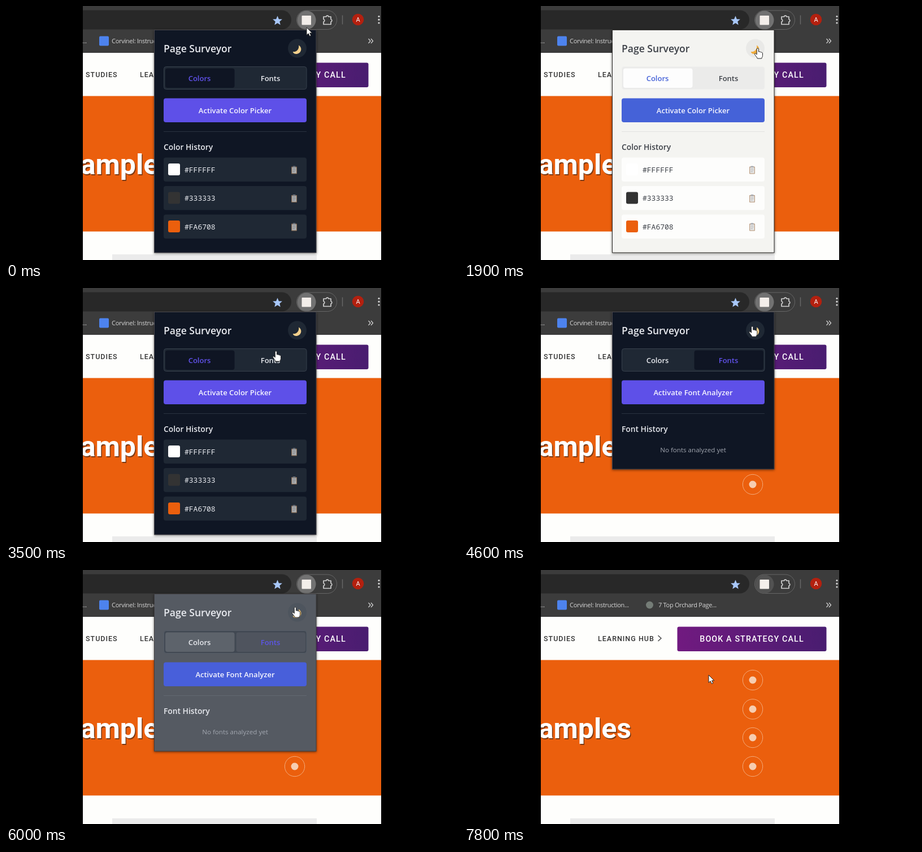
These frames come from a looping animation (800x450 px, 8000 ms). An HTML page:

```html
<!DOCTYPE html>
<html lang="en">
<head>
<meta charset="utf-8">
<title>Colour and font popup</title>
<style>
  html, body { margin: 0; width: 100%; height: 100%; overflow: hidden; background: #000; }
  svg { display: block; width: 800px; height: 450px; }
  .ui { font: 600 13px "Open Sans", "Noto Sans", sans-serif; }
  .mid { text-anchor: middle; }
  .web { font-family: Roboto, Arial, sans-serif; }
  .nav { font-size: 12.5px; font-weight: 500; letter-spacing: 1px; fill: #333; }
  .mark { font: 400 11px "Open Sans", sans-serif; letter-spacing: -.3px; fill: #d6d6d6; }
  .mono { font: 400 13px "Noto Sans Mono", "DejaVu Sans Mono", monospace; fill: var(--text); }
  .text { fill: var(--text); }
  #popup { filter: drop-shadow(0 1px 2px rgba(0, 0, 0, .55)); }
</style>
</head>
<body>
<svg viewBox="0 0 800 450" id="stage">
  <defs>
    <clipPath id="screen"><rect x="136" width="528" height="450"/></clipPath>
    <linearGradient id="purple"><stop stop-color="#711a80"/><stop offset="1" stop-color="#491d70"/></linearGradient>
    <g id="clipboard">
      <rect x="-5" y="-6" width="10" height="13" rx="1" fill="#a8825f"/>
      <rect x="-3.8" y="-4.5" width="7.6" height="10.3" fill="#dcdcdc"/>
      <path d="M-2.5 -2H2.5M-2.5 .5H2.5M-2.5 3H1" stroke="#9b9b9b" stroke-width=".9"/>
      <rect x="-2.5" y="-7" width="5" height="2.6" rx="1" fill="#8b9099"/>
    </g>
  </defs>
  <rect width="800" height="450" fill="#000"/>
  <g clip-path="url(#screen)">
    <!-- browser bars -->
    <rect x="136" width="528" height="83" fill="#3c3c3c"/>
    <rect x="100" y="7.5" width="405" height="34" rx="17" fill="#282828"/>
    <path transform="translate(480.5 26)" fill="#a8c7fa" d="M0 -8.5L2.4 -2.8 8.4 -2.4 3.8 1.6 5.2 7.5 0 4.3 -5.2 7.5 -3.8 1.6 -8.4 -2.4 -2.4 -2.8Z"/>
    <rect x="514.5" y="8" width="71" height="33.5" rx="16.7" fill="none" stroke="#666"/>
    <circle id="glow" cx="532" cy="25" r="16.5"/>
    <rect x="523.5" y="17" width="16.5" height="16.5" rx="1" fill="#f3eeea"/>
    <path d="M562 19H566.5A2.3 2.3 0 0 1 571 19H575V23.5A2.3 2.3 0 0 1 575 28V32.5H562V28A2.3 2.3 0 0 0 562 23.5Z" fill="none" stroke="#d0d0d0" stroke-width="1.7" stroke-linejoin="round"/>
    <path d="M595.5 16.5V32.5" stroke="#666" stroke-width="1.5"/>
    <circle cx="623" cy="24" r="10.3" fill="#b3200f"/>
    <text x="623" y="28" class="web mid" font-size="11" fill="#fff">A</text>
    <g fill="#d8d8d8"><circle cx="660" cy="18.5" r="1.6"/><circle cx="660" cy="24.2" r="1.6"/><circle cx="660" cy="30" r="1.6"/></g>
    <text x="135" y="66" class="mark">...</text>
    <rect x="165" y="53.5" width="17" height="17" rx="2" fill="#4d83ee"/>
    <text x="187" y="66" class="mark">Corvinel: Instruction...</text>
    <circle cx="328.5" cy="62" r="6.5" fill="#757d77"/>
    <text x="344" y="66" class="mark">7 Top Orchard Page...</text>
    <path d="M641.5 58L645 62 641.5 66M646 58L649.5 62 646 66" fill="none" stroke="#d0d0d0" stroke-width="1.3"/>

    <!-- web page -->
    <rect x="136" y="83" width="528" height="367" fill="#fefefc"/>
    <text x="141" y="126" class="web nav">STUDIES</text>
    <text x="237" y="126" class="web nav">LEARNING HUB</text>
    <path d="M343.5 116L349 121 343.5 126" fill="none" stroke="#444" stroke-width="1.4"/>
    <rect x="377.5" y="100.5" width="264" height="43.5" rx="3" fill="url(#purple)"/>
    <text x="509.5" y="127" class="web mid" font-size="14.3" font-weight="500" letter-spacing="1.1" fill="#fff">BOOK A STRATEGY CALL</text>
    <rect x="136" y="159.5" width="528" height="240" fill="#eb5f0d"/>
    <g class="web" font-size="50" font-weight="700" text-anchor="end">
      <text x="297.5" y="299.5" fill="#7a3a15">amples</text>
      <text x="296" y="298" fill="#fff">amples</text>
    </g>
    <g id="social"></g>
    <rect x="188" y="440" width="362" height="10" fill="#ebebeb"/>

    <g id="popup" class="ui">
      <rect id="panel" x="262.5" y="42.5" width="286.5" fill="var(--bg)" stroke="var(--edge)"/>
      <text x="279" y="82" font-size="17.5" class="text">Page Surveyor</text>
      <circle cx="515.5" cy="75" r="16.5" fill="var(--knob)"/>
      <path d="M518 69.5C526 74.500 522 85 513.500 85C510.500 85 508.500 83.500 507.700 81C514 82 519.500 76.500 518 69.500Z" fill="var(--moon)"/>
      <rect x="279.5" y="107.500" width="252.500" height="40" rx="4" fill="var(--frame)" stroke="var(--line)"/>
      <rect id="idle" y="110.500" width="122.500" height="34.500" rx="4" fill="var(--track)"/>
      <rect id="active" y="110.500" width="122.500" height="34.500" rx="4" fill="var(--tab)"/>
      <text id="colorsTab" x="342.500" y="133" class="mid">Colors</text>
      <text id="fontsTab" x="468" y="133" class="mid">Fonts</text>
      <rect x="279" y="163.500" width="253" height="42.500" rx="4" fill="var(--button)"/>
      <text id="action" x="405.500" y="190" class="mid" fill="#f6f6ff"></text>
      <path d="M279 222.500H532" stroke="var(--rule)"/>
      <text id="heading" x="279" y="254.500" font-size="13.800" class="text"></text>
      <g id="rows"></g>
      <text id="empty" x="405.500" y="291" class="mid" font-size="11.600" font-weight="400" fill="var(--muted)">No fonts analyzed yet</text>
    </g>

    <g id="cursor" stroke="#222" stroke-width="1" stroke-linejoin="round" fill="#fff">
      <path id="arrow" d="M0 0V13.500L3.200 10.800 5.400 15.500 7.800 14.400 5.700 9.900H9.800Z"/>
      <path id="hand" d="M-1.800 1.200C-1.800 -.6 1.400 -.6 1.400 1.200V6L3 5.800C4 5.800 4.300 6.300 4.500 6.700C5.500 6.300 6.500 6.700 6.700 7.400C8 7.200 8.500 8 8.500 9V12.500C8.500 15.500 7 16 6.800 18H-.8C-1.200 15.500 -4 13.500 -5.500 10.700C-6.200 9 -4.300 8.400 -3.300 9.600L-1.800 11Z"/>
    </g>
  </g>
</svg>
<script>
const LOOP = 8000, FADE = 300;
const FONTS_AT = 3800, CLOSE_AT = 7300;
const el = id => document.getElementById(id);

// name: [dark, light, speed of the change]
const theme = {
  bg:     ["0f1624", "f4f4f1", 1],
  edge:   ["47454b", "2f2d2b", 1],
  text:   ["e8eaef", "3d4148", 1.5],
  muted:  ["a2a7b0", "858585", 1.5],
  knob:   ["1f2834", "e9e9e7", 1.1],
  moon:   ["f4d08c", "f0ad3c", 1],
  frame:  ["1f2834", "ebebea", 1.2],
  line:   ["37404c", "efefee", 1.2],
  track:  ["1f2834", "ebebea", 1],
  tab:    ["0f1523", "fdfdfd", 1.05],
  accent: ["6152ec", "4562d8", 1.2],
  button: ["5e50e8", "4562d8", .2],
  rule:   ["2a3340", "e2e2e0", 1],
  row:    ["1f2834", "fdfdfc", 1]
};
const toggles = [1500, 2550, 5100, 5850];

// time, x, y of the pointer tip
const path = [
  [0, 532, 38], [100, 532, 39], [900, 521, 74], [1400, 520, 75],
  [2850, 520, 75], [3400, 478, 112], [3950, 478, 112], [4700, 512, 66],
  [6100, 512, 66], [6700, 453, 161], [7000, 433, 186], [LOOP, 433, 186]
];

el("social").innerHTML = [195, 246.5, 297, 348].map(y =>
  `<circle cx="511" cy="${y}" r="17.700" fill="none" stroke="#f3ab7c"/>
   <circle cx="511" cy="${y}" r="6.500" fill="#f6cdb0"/>`).join("");

el("rows").innerHTML = ["#FFFFFF", "#333333", "#FA6708"].map((hex, i) => {
  const y = 268.5 + i * 50.5, fill = i === 2 ? "#eb5f0d" : hex;
  return `<rect x="279" y="${y}" width="253" height="42.500" rx="4" fill="var(--row)"/>
    <rect x="287" y="${y + 10.5}" width="21" height="21" rx="3" fill="${fill}"/>
    <text x="316" y="${y + 26}" class="mono">${hex}</text>
    <use href="#clipboard" x="510" y="${y + 22}" opacity=".75"/>`;
}).join("");

const clamp = v => Math.max(0, Math.min(1, v));
const channels = hex => [0, 2, 4].map(i => parseInt(hex.slice(i, i + 2), 16));

function mix(a, b, p) {
  const to = channels(b);
  return `rgb(${channels(a).map((v, i) => Math.round(v + (to[i] - v) * p))})`;
}

function paintTheme(t) {
  const past = toggles.filter(s => s <= t);
  const toLight = past.length % 2 === 1;
  const k = past.length ? clamp((t - past[past.length - 1]) / FADE) : 1;
  const p = 1 - Math.pow(1 - k, 1.7);
  for (const [name, [dark, light, speed]] of Object.entries(theme)) {
    const q = k === 1 ? 1 : clamp(p * speed);
    el("stage").style.setProperty("--" + name, mix(dark, light, toLight ? q : 1 - q));
  }
}

function pointerAt(t) {
  const i = path.findIndex((step, n) => n > 0 && t <= step[0]);
  const [t0, x0, y0] = path[i - 1], [t1, x1, y1] = path[i];
  const k = (t - t0) / (t1 - t0), e = k * k * (3 - 2 * k);
  return [x0 + (x1 - x0) * e, y0 + (y1 - y0) * e];
}

function isClickable(x, y) {
  const inRow = (top, bottom) => x > 279 && x < 532 && y > top && y < bottom;
  return Math.hypot(x - 515.5, y - 75) < 17 || inRow(110, 145) || inRow(163, 206);
}

const show = (id, on) => el(id).style.display = on ? "" : "none";

function draw(t) {
  const fonts = t >= FONTS_AT, open = t < CLOSE_AT;
  paintTheme(t);

  show("popup", open);
  show("rows", !fonts);
  show("empty", fonts);
  el("panel").setAttribute("height", fonts ? 278.5 : 394.5);
  el("active").setAttribute("x", fonts ? 407.5 : 282);
  el("idle").setAttribute("x", fonts ? 282 : 407.5);
  el("colorsTab").style.fill = fonts ? "var(--text)" : "var(--accent)";
  el("fontsTab").style.fill = fonts ? "var(--accent)" : "var(--text)";
  el("action").textContent = fonts ? "Activate Font Analyzer" : "Activate Color Picker";
  el("heading").textContent = fonts ? "Font History" : "Color History";
  el("glow").setAttribute("fill", open ? "#727272" : "#525252");

  const [x, y] = pointerAt(t);
  const hand = open && isClickable(x, y);
  el("cursor").setAttribute("transform", `translate(${x} ${y})`);
  show("hand", hand);
  show("arrow", !hand);
}

const start = performance.now();
function tick() {
  draw((performance.now() - start) % LOOP);
  requestAnimationFrame(tick);
}
tick();
</script>
</body>
</html>
```
